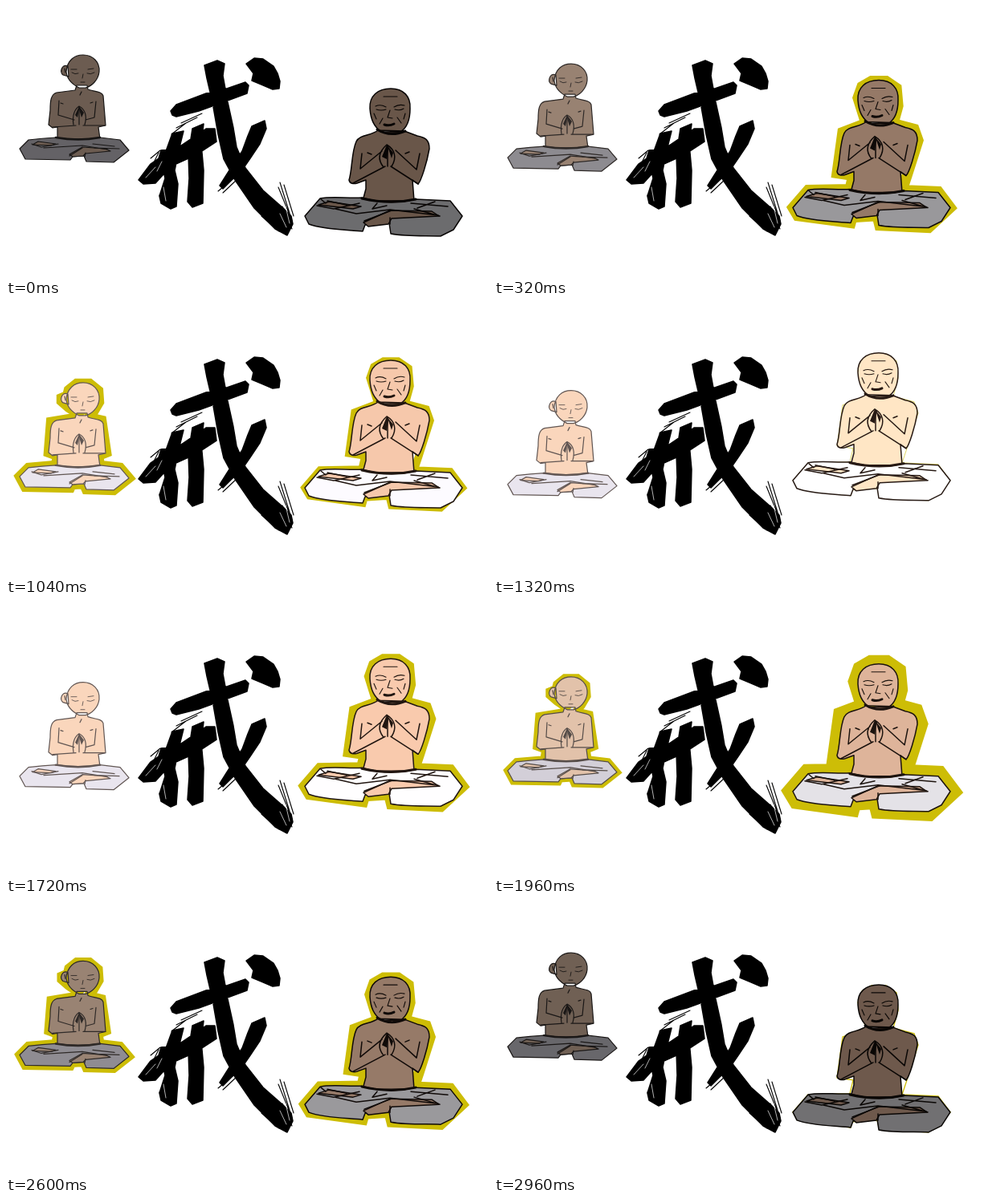
An HTML page with a canvas for the animation above (3 s loop, 600 by 338 pixels).

```html
<!DOCTYPE html>
<html lang="zh">
<head>
<meta charset="utf-8">
<style>
html, body { margin: 0; width: 100%; height: 100%; overflow: hidden; background: #fff; }
canvas { display: block; }
</style>
</head>
<body>
<canvas id="stage" width="600" height="338"></canvas>
<script>
const ctx = document.getElementById('stage').getContext('2d');
const LOOP = 3000, STEP = 40;

// Piecewise linear value through [time, value] pairs
function track(t, keys) {
  for (let i = 1; i < keys.length; i++) {
    const [t0, a] = keys[i - 1], [t1, b] = keys[i];
    if (t <= t1) return a + (b - a) * (t - t0) / (t1 - t0);
  }
  return keys[keys.length - 1][1];
}

const shade = (rgb, k) => `rgb(${rgb.map(c => Math.min(255, Math.round(c * k)))})`;
const path = d => new Path2D(d);

const ink = path(`
  M299 72L309 65 320 66 333 75 338 84 341 94 340 103 332 104 318 98 306 93 308 84Z
  M205 131L212 123 249 109 272 104 298 95 302 99 300 109 273 119 240 131 212 138 207 136Z
  M247 74L263 68 272 72 270 87 276 120 283 152 287 176 298 202 320 230 345 252 355 262 357 272 350 286 335 278 309 252 285 217 271 191 264 160 257 120 250 90Z
  M322 143L324 153 316 172 304 190 293 206 281 217 270 228 266 224 278 205 294 181 301 162 306 150Z
  M207 159L221 156 215 180 210 205 214 222 212 250 205 253 193 246 191 237 198 215 194 195Z
  M232 153L246 147 243 172 246 205 245 246 232 251 226 244 228 215 227 185Z
  M165 217L180 197 190 190 193 180 215 176 249 153 260 153 262 169 236 186 205 200 186 221 171 222Z`);
const dryInk = path(`M341 220L356 268M346 223L358 262M339 226L352 258M344 250L356 278
  M318 262L340 281M264 231L284 214M270 233L288 216M218 146L244 134M212 152L238 139
  M206 160L224 146M180 190L192 180M184 195L190 183M191 236L196 246`);
const scratches = path(`M348 250L353 271M341 259L349 276M196 226L199 243M174 214L186 201M188 206L194 194`);

const figures = [
  {
    halo: 'M75 82L78 70 88 62 104 62 115 71 116 85 109 97 102 104 119 108 125 148 115 152 117 164 142 167 153 180 134 195 100 194 97 187 82 188 80 192 24 191 17 178 28 167 62 164 64 152 53 148 56 110 86 105 90 100 78 92 69 84 69 76Z',
    skinArea: `M77 75C70 72 66 82 71 86L78 88Z
      M88 99L86 105 63 108C56 110 55 118 55 130L53 148 58 152 64 151 64 166 117 166 115 151 124 149 121 112C119 106 110 107 102 104L101 99Z
      M75 82C76 68 85 61 96 61C108 61 117 70 116 82C115 92 107 100 99 102L91 102C83 98 76 92 75 82Z`,
    pantsArea: 'M62 164Q45 165 28 167L17 178 24 191 80 192 83 188 97 187 100 194 134 195 153 180 142 167 117 164Q90 168 62 164Z',
    feet: 'M79 185L95 176 124 178 130 181 99 184 96 187 83 188ZM33 173L40 169 62 172 56 174Z',
    lines: `M66 118L65 136 85 142M58 151L87 149M112 119L110 139 99 142M123 149L96 149
      M84 148C82 136 86 128 91 125C99 129 101 138 98 148M91 126L91 148M73 78L74 83
      M32 172L44 176 65 172M47 177L95 174 126 179M108 172L135 175M110 177L141 178
      M79 187L95 177M99 183L98 188M94 107L92 111M68 121L71 122M105 121L108 120`,
    face: 'M82 83Q86 86 90 84M101 84Q105 86 110 83M81 79L88 79M102 79L109 78M96 85L95 90M93 95L98 95',
    heavy: 'M62 164Q90 169 117 164',
    hands: 'M86 136L91 125 97 133 94 139 91 129 89 139Z',
    skin: [250, 214, 188], pants: [233, 229, 238], peak: 1, line: [108, 96, 92], width: 1.2,
    rise: 47,
    glow: [[0, 0], [320, 0], [960, 7], [1160, 5], [1320, 0], [1720, 0], [2260, 10.5], [2980, 0], [3000, 0]]
  },
  {
    halo: 'M453 125L458 111 470 104 488 104 501 113 503 135 497 157 523 164 528 178 514 222 508 240 553 242 568 262 541 287 480 284 477 272 446 274 444 281 378 272 372 262 391 240 443 239 447 222 427 219 434 168 463 157Z',
    skinArea: `M463 155C455 162 440 160 436 169C430 182 431 205 427 217C428 222 433 222 437 221L448 217 448 228 444 243 508 243 506 217 513 222C517 218 524 195 527 178C527 167 522 164 512 162L496 156Z
      M453 128C452 112 463 103 479 103C495 103 504 113 503 128C503 142 499 152 491 157L467 157C458 150 454 142 453 128Z`,
    pantsArea: 'M443 239C425 240 405 237 391 240L372 262 377 272C395 279 425 279 444 281L447 273 477 271 479 284C500 288 525 286 541 287L557 279 568 262 553 243 510 241Q478 249 443 239Z',
    feet: 'M445 270L478 255 530 256 539 262 480 265 476 272 451 275ZM389 248L402 244 442 250 432 253Z',
    lines: `M443 184L441 203 468 181M432 221L472 200M515 184L511 204 485 180M513 222L479 200
      M470 201C461 190 465 181 474 173C484 179 487 189 480 200M475 175L475 200
      M387 249L408 253 440 246M400 243L424 248M410 253L436 259 478 254 538 261M446 268L480 255
      M504 246L550 250M512 252L534 244M508 253L540 262M478 264L478 272M462 246L456 253 474 249
      M392 241L398 246M450 183L455 185M497 184L502 182`,
    face: `M460 125Q466 122 473 126M483 126Q489 122 496 124M461 129Q467 131 473 129M484 129Q490 131 495 128
      M478 130L475 139 481 140M469 140L465 147M487 139L492 146M458 134L461 141M497 134L495 141M470 113L487 113`,
    heavy: 'M462 154Q478 164 497 156M443 240Q478 248 510 241M471 148Q477 150 483 147',
    hands: 'M468 188L474 173 482 183 480 190 476 178 474 191Z',
    skin: [245, 199, 170], pants: [252, 250, 255], peak: 1.2, line: [36, 24, 18], width: 1.5,
    rise: -44.5,
    glow: [[0, 0], [580, 12], [1340, 0], [1380, 0], [2100, 15], [3000, 0]]
  }
];
const parts = ['halo', 'skinArea', 'pantsArea', 'feet', 'lines', 'face', 'heavy', 'hands'];
for (const f of figures) for (const p of parts) f[p] = path(f[p]);

function stroke(shape, color, width) {
  ctx.strokeStyle = color;
  ctx.lineWidth = width;
  ctx.stroke(shape);
}

function fill(shape, color) {
  ctx.fillStyle = color;
  ctx.fill(shape);
}

function drawFigure(f, t) {
  const light = Math.min(f.peak, track(t, [[0, .43], [1360, 1.18], [3000, .43]]));
  const glow = track(t, f.glow);
  const skin = shade(f.skin, light), line = shade(f.line, Math.max(.2, light * 1.2 - .3));
  ctx.save();
  ctx.translate(0, track(t, [[0, 0], [1360, f.rise], [3000, 0]]));
  ctx.lineJoin = 'miter';
  ctx.miterLimit = 2;
  if (glow > .3) stroke(f.halo, '#cdbd06', glow * 2);
  ctx.lineJoin = ctx.lineCap = 'round';
  for (const [shape, color] of [[f.skinArea, skin], [f.pantsArea, shade(f.pants, light)], [f.feet, skin]]) {
    fill(shape, color);
    stroke(shape, line, f.width);
  }
  stroke(f.lines, line, f.width);
  stroke(f.face, line, f.width * .75);
  stroke(f.heavy, line, f.width * 2);
  fill(f.hands, line);
  ctx.restore();
}

function drawInk() {
  ctx.lineJoin = ctx.lineCap = 'round';
  fill(ink, '#000');
  stroke(ink, '#000', 1.5);
  stroke(dryInk, '#000', 1.1);
  stroke(scratches, '#fff', .7);
}

function draw(now) {
  const t = Math.floor(now % LOOP / STEP) * STEP;
  fill(path('M0 0H600V338H0Z'), '#fff');
  drawInk();
  figures.forEach(f => drawFigure(f, t));
  requestAnimationFrame(() => draw(performance.now()));
}
draw(performance.now());
</script>
</body>
</html>
```
